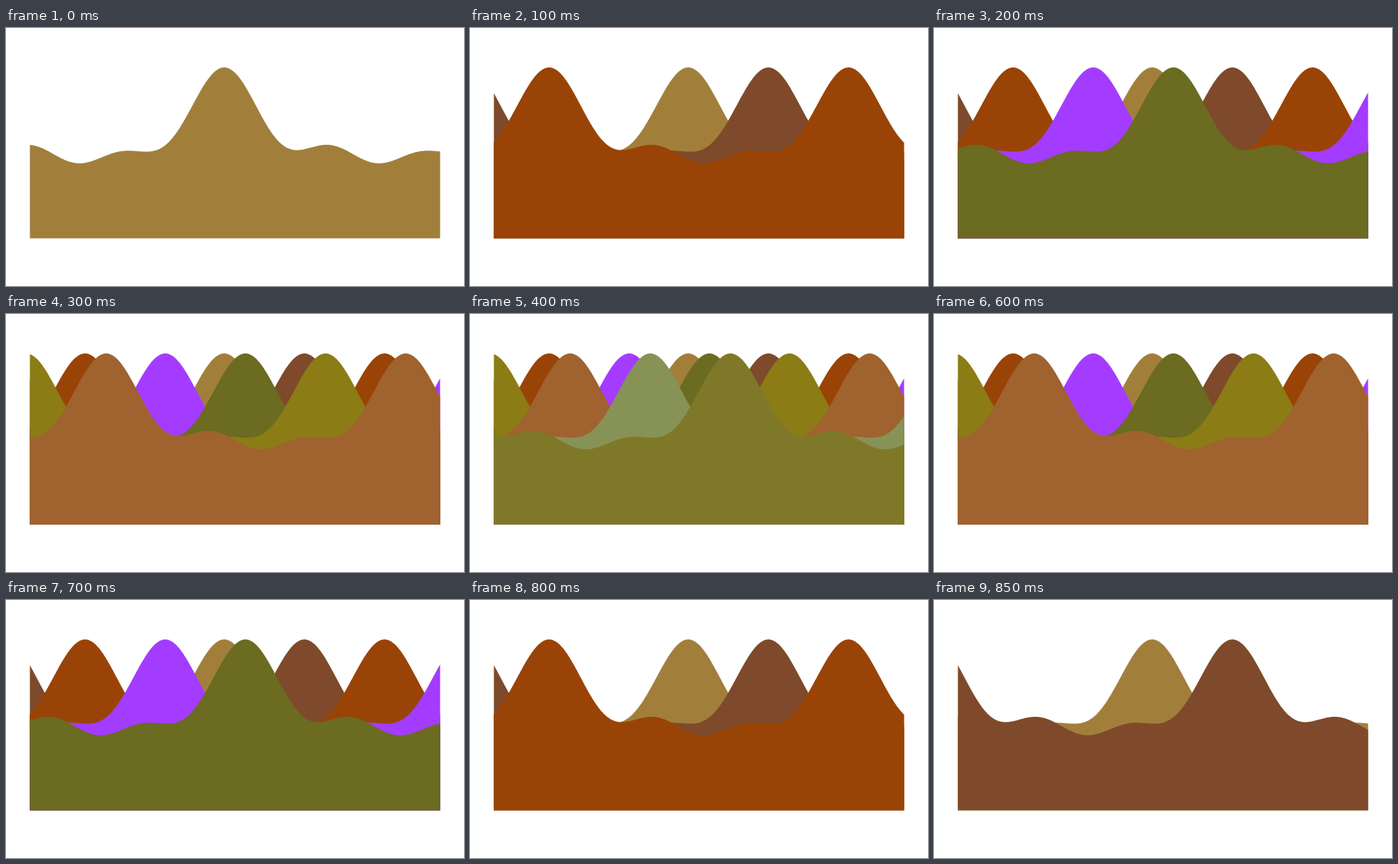
Recreate the animation shown at these times as an HTML page. Size 640 px wide and 360 px high, loop 0.9 s.

```html
<!DOCTYPE html>
<html lang="en">
<head>
<meta charset="utf-8">
<title>Stacked waves</title>
<style>
  html, body { margin: 0; width: 100%; height: 100%; overflow: hidden; background: #fff; }
  svg { display: block; width: 640px; height: 360px; }
</style>
</head>
<body>
<svg id="stage" viewBox="0 0 640 360"></svg>
<script>
const LEFT = 33.4, RIGHT = 606.6, FLOOR = 293.6;
const MID = 146.5, AMP = 50, PERIOD = 418.5;
const PEAK = 305, SHIFT = 112;
const STEP = 50, LOOP = 900;
const COLORS = ['#a17f3b', '#7e4a2b', '#994406', '#a43cff', '#6b6b21',
                '#8c7c16', '#a0622f', '#879257', '#807829', '#8f6f2c'];

// Three harmonics with amplitudes 1, 1/2, 1/3, nearly in phase at the peak
function waveY(d) {
  const p = 2 * Math.PI * d / PERIOD;
  return MID - AMP * (Math.cos(p - 0.043) + Math.cos(2 * p + 0.107) / 2 + Math.cos(3 * p - 0.064) / 3);
}

function wavePath(peak) {
  const pts = [];
  for (let x = LEFT; x < RIGHT; x++) pts.push(x.toFixed(1) + ' ' + waveY(x - peak).toFixed(2));
  pts.push(RIGHT + ' ' + waveY(RIGHT - peak).toFixed(2));
  return `M${LEFT} ${FLOOR}L${pts.join('L')}L${RIGHT} ${FLOOR}Z`;
}

const stage = document.getElementById('stage');
COLORS.forEach((color, i) => {
  const path = document.createElementNS('http://www.w3.org/2000/svg', 'path');
  path.setAttribute('d', wavePath(PEAK + i * SHIFT));
  path.setAttribute('fill', color);
  stage.append(path);
  if (i === 0) return;

  // Layers pile up one by one, then come off in reverse order
  const show = i * STEP / LOOP, hide = 1 - (i - 1) * STEP / LOOP;
  path.animate([
    { opacity: 0, offset: 0, easing: 'step-end' },
    { opacity: 1, offset: show, easing: 'step-end' },
    { opacity: i === 1 ? 1 : 0, offset: hide, easing: 'step-end' },
    ...(i === 1 ? [] : [{ opacity: 0, offset: 1 }])
  ], { duration: LOOP, iterations: Infinity });
});
</script>
</body>
</html>
```
